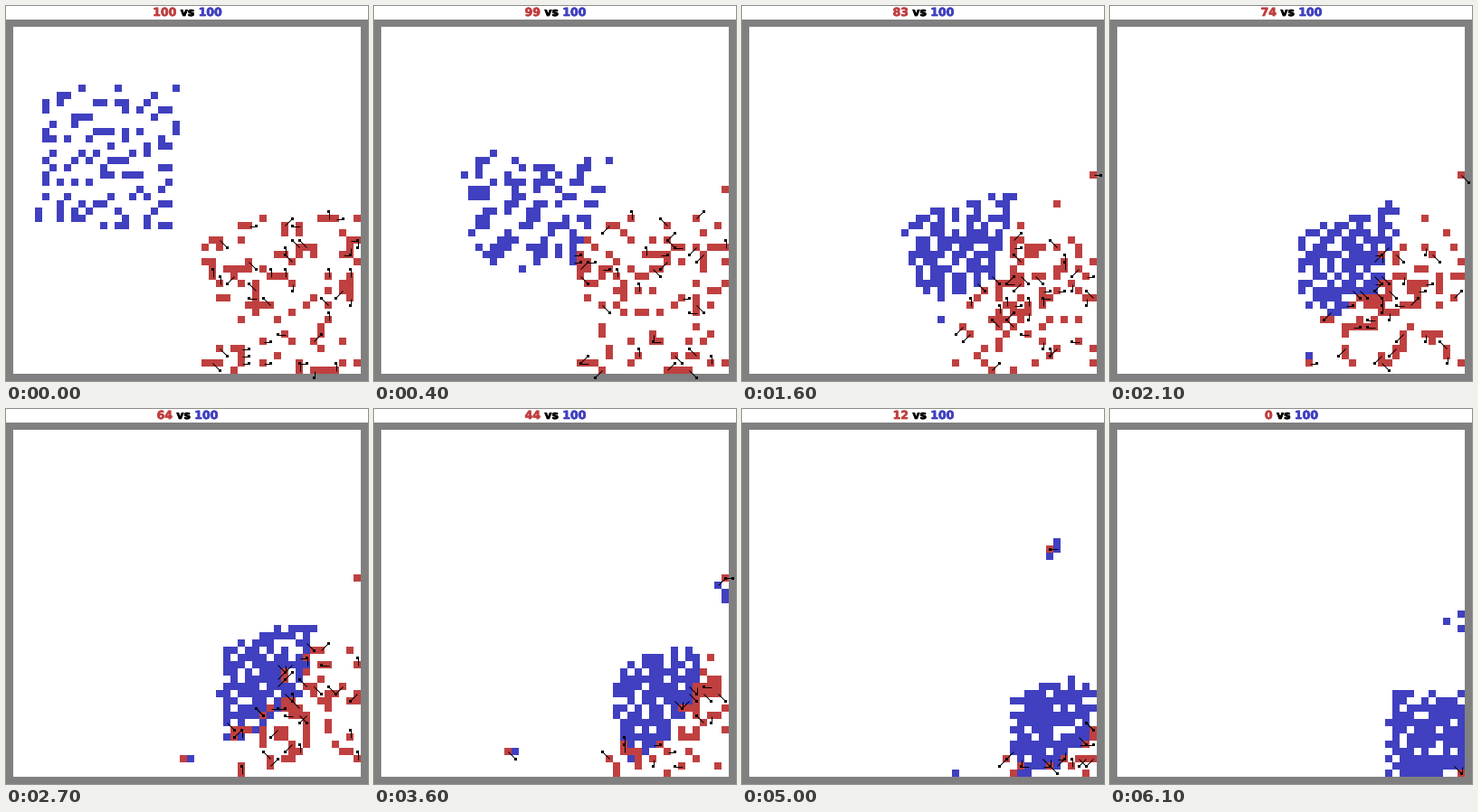
A matplotlib script that plays this animation: 400 by 415 pixels, repeating every 6.2 s.

```python
import math
import numpy as np
import matplotlib.pyplot as plt
from matplotlib import patheffects
from matplotlib.animation import FuncAnimation
from matplotlib.collections import LineCollection, PolyCollection

W, H, DPI = 400, 415, 100
CELL, LEFT, TOP, N = 8, 8, 23, 48
FRAMES, INTERVAL = 62, 100
LAST = FRAMES - 1
RED, BLUE = (192, 64, 64), (64, 64, 192)
ARMY, CHARGE = 100, 4

# Reds still alive at a few moments
KILL_TIMES = [0, 4, 16, 27, 36, 50, 61]
RED_LEFT = [100, 99, 83, 64, 44, 12, 0]

# Lone reds: leave, die, from, to, number of pursuers
RUNNERS = [(18, 39, (28, 46), (16, 44), 1),
           (35, 51, (47, 20), (41, 16), 3)]

AROUND = [(dx, dy) for dx in (-1, 0, 1) for dy in (-1, 0, 1) if dx or dy]


def near(cell):
    return [(cell[0] + dx, cell[1] + dy) for dx, dy in AROUND]


def inside(cell):
    return 0 <= cell[0] < N and 0 <= cell[1] < N


def dist2(a, b):
    return (a[0] - b[0]) ** 2 + (a[1] - b[1]) ** 2


def mix(a, b, p):
    return a + (b - a) * p


def front(t):
    """Diagonal front line: reds keep column + row above this value."""
    return mix(54, 92, t / LAST)


def blue_target(t, home):
    """Square formation that charges, tilts along the front, then fills the corner."""
    u, v = 2 * home - 1
    if t < CHARGE:
        cx, cy = mix(12.5, 21, t / CHARGE), mix(18, 25.5, t / CHARGE)
    else:
        left = (LAST - t) / (LAST - CHARGE)
        cx, cy = mix(42.5, 21, left ** 2), mix(42, 25.5, left ** 1.5)
    taper = 0.3 * min(t / CHARGE, 1) * (1 - t / LAST)
    wide = (5.2 + 4.6 * math.exp(-t / 9)) * (1 - taper * v)
    high = 5.8 + 4.2 * math.exp(-t / 3)
    tilt = 3.2 * math.sin(math.pi * t / LAST)
    x, y = cx + u * wide, cy + v * high - u * tilt
    over = max(x + y - front(t) - 4, 0)
    return min(x - over, N - 1), min(y - over, N - 1)


def red_home(t, rng):
    while True:
        x, y = rng.uniform(26, 47.4), rng.uniform(25.6, 47.4)
        if x + y > front(t):
            return x, y


def runner_target(i, t):
    start, death, a, b, _ = RUNNERS[i]
    p = min(max((t - start) / (death - 1 - start), 0), 1)
    return round(mix(a[0], b[0], p)), round(mix(a[1], b[1], p))


def place(target, taken):
    free = [(c, r) for c in range(N) for r in range(N) if (c, r) not in taken]
    cell = min(free, key=lambda p: dist2(p, target))
    taken.add(cell)
    return cell


def walk(cell, target, taken, steps=1):
    taken.discard(cell)
    for _ in range(steps):
        options = [cell] + [p for p in near(cell) if inside(p) and p not in taken]
        cell = min(options, key=lambda p: dist2(p, target))
    taken.add(cell)
    return cell


def wander(cell, taken, rng):
    spot = near(cell)[rng.integers(8)]
    if not inside(spot) or spot in taken:
        return cell
    taken.discard(cell)
    taken.add(spot)
    return spot


def choose_dead(red, blue, t, rng):
    quota = len(red) - round(np.interp(t, KILL_TIMES, RED_LEFT))
    cells = set(blue)

    def threat(i):
        contact = sum(p in cells for p in near(red[i]))
        gap = min(dist2(red[i], b) for b in blue) ** 0.5
        return contact - 2 * gap + rng.random()

    caught = [i for i in red if i < len(RUNNERS) and t >= RUNNERS[i][1]]
    crowd = sorted((i for i in red if i >= len(RUNNERS)), key=threat, reverse=True)
    return (caught + crowd)[:max(quota, 0)]


def find_blows(red, blue, rng):
    blows = []
    targets = set(red.values())
    for cell in red.values():
        if rng.random() < 0.38:
            blows.append((cell, near(cell)[rng.integers(8)]))
    for cell in blue:
        foes = [p for p in near(cell) if p in targets]
        if foes and rng.random() < 0.5:
            blows.append((cell, foes[rng.integers(len(foes))]))
    return blows


def simulate():
    rng = np.random.default_rng(5)
    taken, dead, history, chase = set(), [], [], {}
    side = math.isqrt(ARMY)
    slots = np.array([(i % side, i // side) for i in range(ARMY)])
    blue_homes = (slots + rng.random((ARMY, 2))) / side
    red_homes = [red_home(0, rng) for _ in range(ARMY)]
    red_homes[0], red_homes[1] = (26, 46), (47, 26)
    red = {i: place(home, taken) for i, home in enumerate(red_homes)}
    blue = [place(blue_target(0, home), taken) for home in blue_homes]

    for t in range(FRAMES):
        for i in dead:
            taken.discard(red.pop(i))
        for k, (start, _, _, _, size) in enumerate(RUNNERS):
            if t == start - 4:
                ranked = sorted(range(ARMY), key=lambda i: dist2(blue[i], red[k]))
                chase.update((i, k) for i in ranked[:size])
        if t:
            for i in red:
                if i < len(RUNNERS):
                    red[i] = walk(red[i], runner_target(i, t), taken)
                    continue
                if sum(red_homes[i]) < front(t) or rng.random() < 0.08:
                    red_homes[i] = red_home(t, rng)
                if rng.random() < 0.4:
                    red[i] = wander(red[i], taken, rng)
                else:
                    red[i] = walk(red[i], red_homes[i], taken)
            for i in range(ARMY):
                if rng.random() < 0.12:
                    blue_homes[i] = (slots[i] + rng.random(2)) / side
                prey = red.get(chase.get(i))
                target = prey or blue_target(t, blue_homes[i])
                blue[i] = walk(blue[i], target, taken, 3 if t <= CHARGE else 1)
        dead = choose_dead(red, blue, t, rng)
        blows = find_blows(red, blue, rng)
        history.append((list(red.values()), list(blue), blows, len(red) - len(dead)))
    return history


history = simulate()

fig = plt.figure(figsize=(W / DPI, H / DPI), dpi=DPI, facecolor="white")
ax = fig.add_axes([0, 0, 1, 1], zorder=2)
ax.axis("off")
ax.set_xlim(0, W)
ax.set_ylim(H, 0)


def paint(reds, blues):
    cells = np.full((N, N, 3), 255, np.uint8)
    for group, color in ((blues, BLUE), (reds, RED)):
        for c, r in group:
            cells[r, c] = color
    stage = np.full((H, W, 3), 128, np.uint8)
    stage[:15] = 255
    field = cells.repeat(CELL, axis=0).repeat(CELL, axis=1)
    stage[TOP:TOP + N * CELL, LEFT:LEFT + N * CELL] = field
    return stage


board = fig.figimage(paint([], []), origin="upper", zorder=1)
swings = LineCollection([], colors="black", linewidths=72 / DPI, zorder=3)
tips = PolyCollection([], facecolors="black", edgecolors="none", zorder=4)
ax.add_collection(swings, autolim=False)
ax.add_collection(tips, autolim=False)

# Score line: DejaVu Sans Bold advances at 12.5 px
EM = 12.5
DIGIT, SPACE, VERSUS = 0.696 * EM, 0.348 * EM, 1.247 * EM


def label(color):
    heavy = patheffects.withStroke(linewidth=0.5, foreground=color)
    return ax.text(0, 11, "", color=color, family="DejaVu Sans", weight="bold",
                   fontsize=EM * 72 / DPI, ha="left", va="baseline",
                   path_effects=[heavy])


red_text = label(np.array(RED) / 255)
versus_text = label("black")
blue_text = label(np.array(BLUE) / 255)


def show_score(reds, blues):
    widths = (len(str(reds)) * DIGIT, VERSUS, len(str(blues)) * DIGIT)
    x = W / 2 + 0.5 - (sum(widths) + 2 * SPACE) / 2
    for text, value, width in zip((red_text, versus_text, blue_text),
                                  (reds, "vs", blues), widths):
        text.set_text(str(value))
        text.set_x(x)
        x += width + SPACE


def center(cell):
    return LEFT + CELL * (cell[0] + 0.5) + 0.5, TOP + CELL * (cell[1] + 0.5) + 0.5


def dot(x, y, r=1.25):
    return [(x - r, y - r), (x + r, y - r), (x + r, y + r), (x - r, y + r)]


def update(t):
    reds, blues, blows, alive = history[t]
    board.set_data(paint(reds, blues))
    ends = [(center(a), center(b)) for a, b in blows]
    swings.set_segments(ends)
    tips.set_verts([dot(*b) for _, b in ends])
    show_score(alive, len(blues))
    return board, swings, tips, red_text, versus_text, blue_text


anim = FuncAnimation(fig, update, frames=FRAMES, interval=INTERVAL,
                     repeat=True, repeat_delay=0, blit=False)
plt.show()
```
